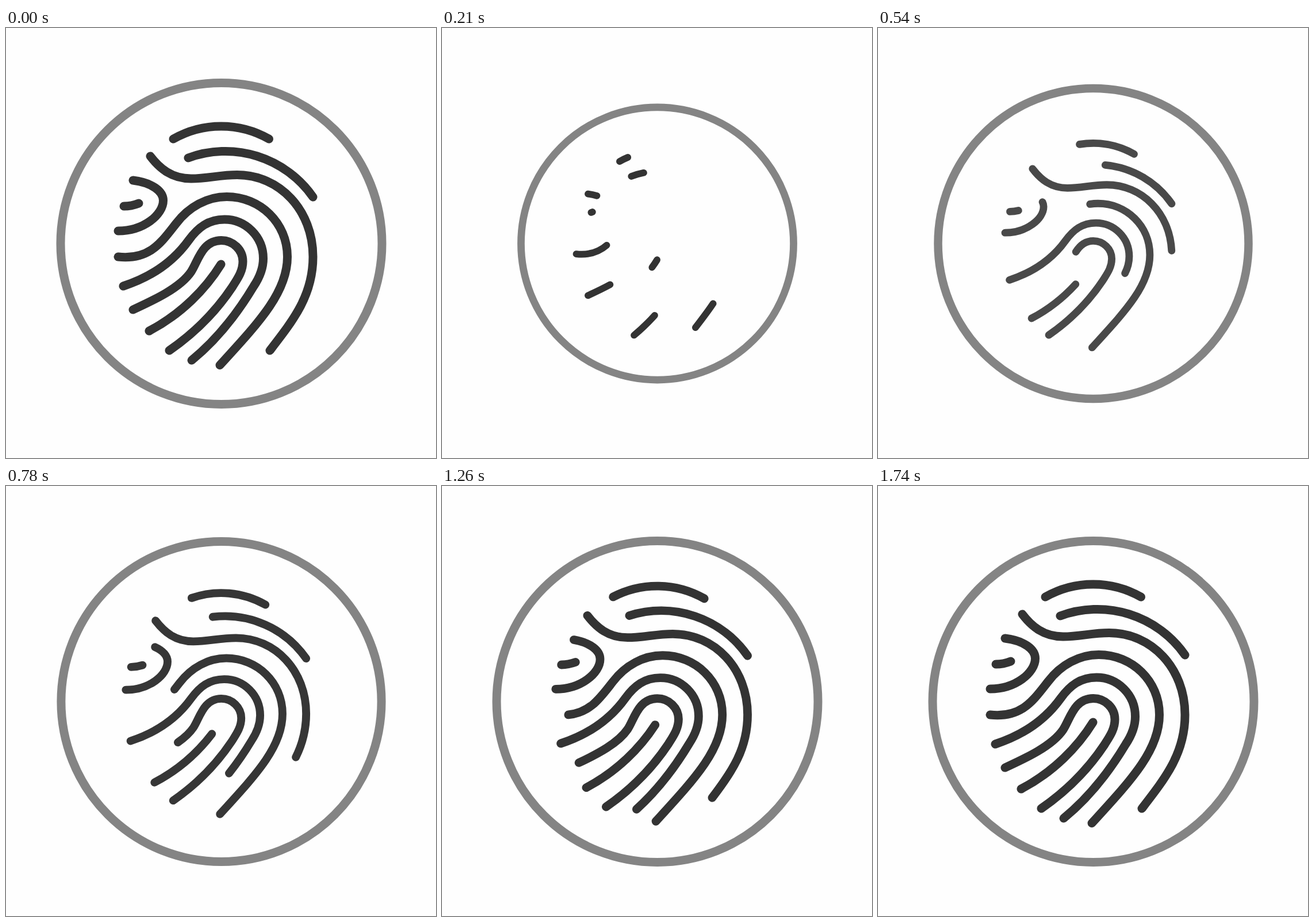
An HTML page for the animation above (3800 ms loop, 748x748 px).

```html
<!DOCTYPE html>
<html lang="en">
<head>
<meta charset="utf-8">
<title>Fingerprint</title>
<style>
  html, body { margin: 0; width: 100%; height: 100%; overflow: hidden; background: #fefefe; }
  svg { display: block; width: 100vw; height: 100vh; }
  svg * { fill: none; stroke-width: 15; }
  #ring { stroke: #848484; }
  #print { stroke: #333; stroke-linecap: round; }
</style>
</head>
<body>
<svg viewBox="0 0 748 748">
  <circle id="ring" cx="374.5" cy="375" r="279.5"/>
  <g id="print">
    <path d="M291 193A168 168 0 0 1 457.5 193"/>
    <path d="M317 226A186 186 0 0 1 534 294"/>
    <path d="M459 561C500 508 534 465 534 398C534 317 476 255.5 402 255.5C372 255.5 350 262 322 262C288 262 267 244 251 223"/>
    <path d="M221 265C254 269 273.5 284 273.5 300C273.5 325 239 353 195 353"/>
    <path d="M231 305Q218 310 205 310"/>
    <path d="M195 398C250 404 270 373 296 340C318 311 350 293.5 384 293.5C442 293.5 489.5 339 489.5 398C489.5 460 440 512 372 586.5"/>
    <path d="M323 578C367 542 404 494 431 449C441 434 447.5 419 447.5 401C447.5 363 417 333 380 333C352 333 334 347 318 369C290 408 250 434 204 449"/>
    <path d="M221 490C258 473 303 452 322 424C334 406 341 369.5 374.5 369.5C395 369.5 412 386 412 406C412 424 402 437 394 450C362 498 326 532 284 561"/>
    <path d="M374 411C348 453 306 497 249 527"/>
  </g>
</svg>
<script>
const LOOP = 3800, STEP = 30, TURN = 270, RING_END = 1080, END = 1740;
const ring = document.getElementById('ring');
const print = document.getElementById('print');
const ridges = [...print.children];
ridges.forEach(ridge => ridge.setAttribute('pathLength', 1));

// Share of the redraw still to come: [ms, remainder], decaying between points.
const decay = [[TURN, 1], [540, .34], [780, .175], [1020, .086], [1260, .036], [END, .002]];

function remainder(t) {
  if (t >= END) return 0;
  const i = decay.findIndex(([ms]) => ms > t);
  const [t0, a] = decay[i - 1], [t1, b] = decay[i];
  return a * (b / a) ** ((t - t0) / (t1 - t0));
}

function scale(el, s) {
  el.setAttribute('transform', `translate(374.5 375) scale(${s}) translate(-374.5 -375)`);
}

// Shows the part of every ridge between two fractions of its length.
function trim(from, to) {
  for (const { style } of ridges) {
    style.strokeDasharray = from <= 0 && to >= 1 ? 'none' : `${to - from} 2`;
    style.strokeDashoffset = -from;
  }
}

function draw(t) {
  if (t < TURN) {
    const out = .5 - .5 * Math.cos(Math.PI * t / TURN);
    scale(ring, 1 - .172 * out);
    scale(print, 1 - .243 * out);
    print.style.opacity = 1;
    trim(0, 1 - out);
  } else {
    const left = remainder(t);
    const ringLeft = Math.max(0, (RING_END - t) / (RING_END - TURN)) ** 4;
    scale(ring, 1 - .172 * ringLeft);
    scale(print, 1 - .425 * left);
    print.style.opacity = t >= RING_END ? 1 : 1 - Math.exp(-.0081 * (t - TURN));
    trim(left, 1);
  }
}

const start = performance.now();
function tick() {
  const t = (performance.now() - start) % LOOP;
  draw(Math.floor(t / STEP) * STEP);
  requestAnimationFrame(tick);
}
tick();
</script>
</body>
</html>
```
